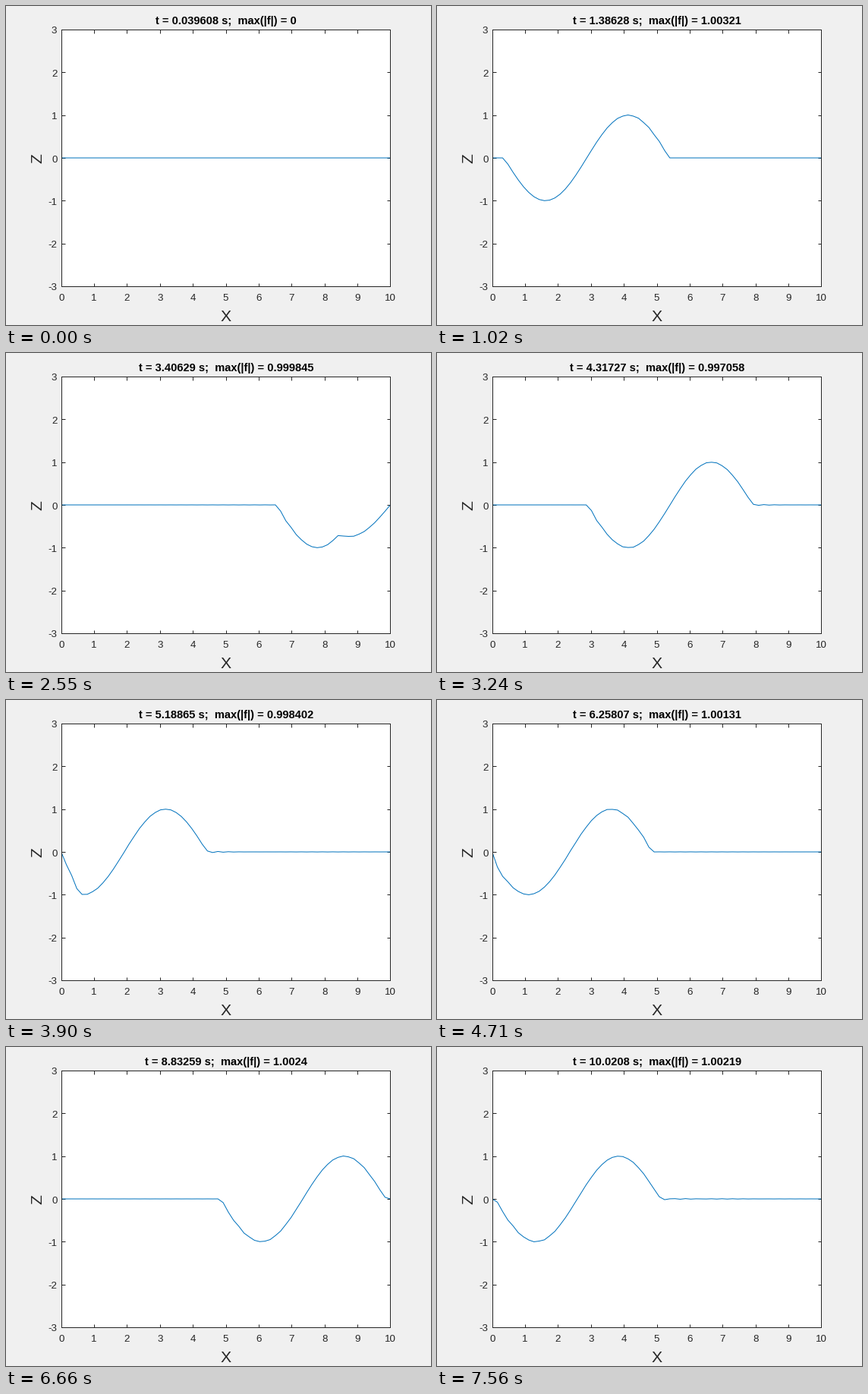
A matplotlib script that plays this animation: 560 px wide and 420 px high, repeating every 7.59 s.

```python
import numpy as np
import matplotlib.pyplot as plt
from matplotlib.animation import FuncAnimation

W, H, DPI = 560, 420, 100
FRAMES, INTERVAL = 253, 30
PX = 72 / DPI                      # one pixel in points
INK = "#262626"
# Plot box in pixels, y measured downwards
LEFT, RIGHT, TOP, BOTTOM = 72.7, 506.4, 31.0, 369.0

# Wave equation on a string with fixed ends, shaken for one period at x = 0
CELLS, LENGTH, SPEED, OMEGA = 63, 10.0, 4.0, 5.0
DT = 0.03960801
X = np.linspace(0, LENGTH, CELLS + 1)
R2 = (SPEED * DT / (LENGTH / CELLS)) ** 2


def drive(t):
    return np.sin(OMEGA * t) if OMEGA * t < 2 * np.pi else 0.0


def simulate():
    states = [np.zeros(CELLS + 1)]
    old = now = states[0]
    for k in range(1, FRAMES):
        new = np.zeros(CELLS + 1)
        bend = now[2:] - 2 * now[1:-1] + now[:-2]
        new[1:-1] = 2 * now[1:-1] - old[1:-1] + R2 * bend
        new[0] = drive(k * DT)
        old, now = now, new
        states.append(new)
    return states


plt.rcParams["font.family"] = "Liberation Sans"
fig = plt.figure(figsize=(W / DPI, H / DPI), dpi=DPI, facecolor="#f0f0f0")
ax = fig.add_axes([LEFT / W, 1 - BOTTOM / H, (RIGHT - LEFT) / W, (BOTTOM - TOP) / H])
ax.set(xlim=(0, LENGTH), ylim=(-3, 3), xticks=range(11), yticks=range(-3, 4))
ax.tick_params(direction="in", top=True, right=True, length=4.5 * PX,
               width=PX, color=INK, labelbottom=False, labelleft=False)
for spine in ax.spines.values():
    spine.set(linewidth=PX, edgecolor=INK)


def label(x, y, s, size=13.33, color=INK, **kw):
    """Text with its baseline placed in pixels from the top left corner."""
    kw = {"ha": "center", "va": "baseline", "rotation_mode": "anchor", **kw}
    return fig.text(x / W, 1 - y / H, s, fontsize=size * PX, color=color, **kw)


for i in range(11):
    label(LEFT + (RIGHT - LEFT) * i / 10, 388, str(i))
for v in range(-3, 4):
    y = BOTTOM - (BOTTOM - TOP) * (v + 3) / 6
    label(67.5, y + 5.5, str(v), ha="right")
label(290, 415, "X", 21.33)
label(47, 200.5, "Z", 21.33, rotation=90)
title = label(290, 24, "", 14.67, "black", weight="bold")

states = simulate()
line, = ax.plot(X, states[0], color="#0072bd", lw=PX, snap=False)


def update(k):
    f = states[k]
    line.set_ydata(f)
    title.set_text(f"t = {(k + 1) * DT:g} s;  max(|f|) = {np.abs(f).max():g}")
    return line, title


anim = FuncAnimation(fig, update, frames=FRAMES, interval=INTERVAL,
                     repeat=True, repeat_delay=0)
plt.show()
```
